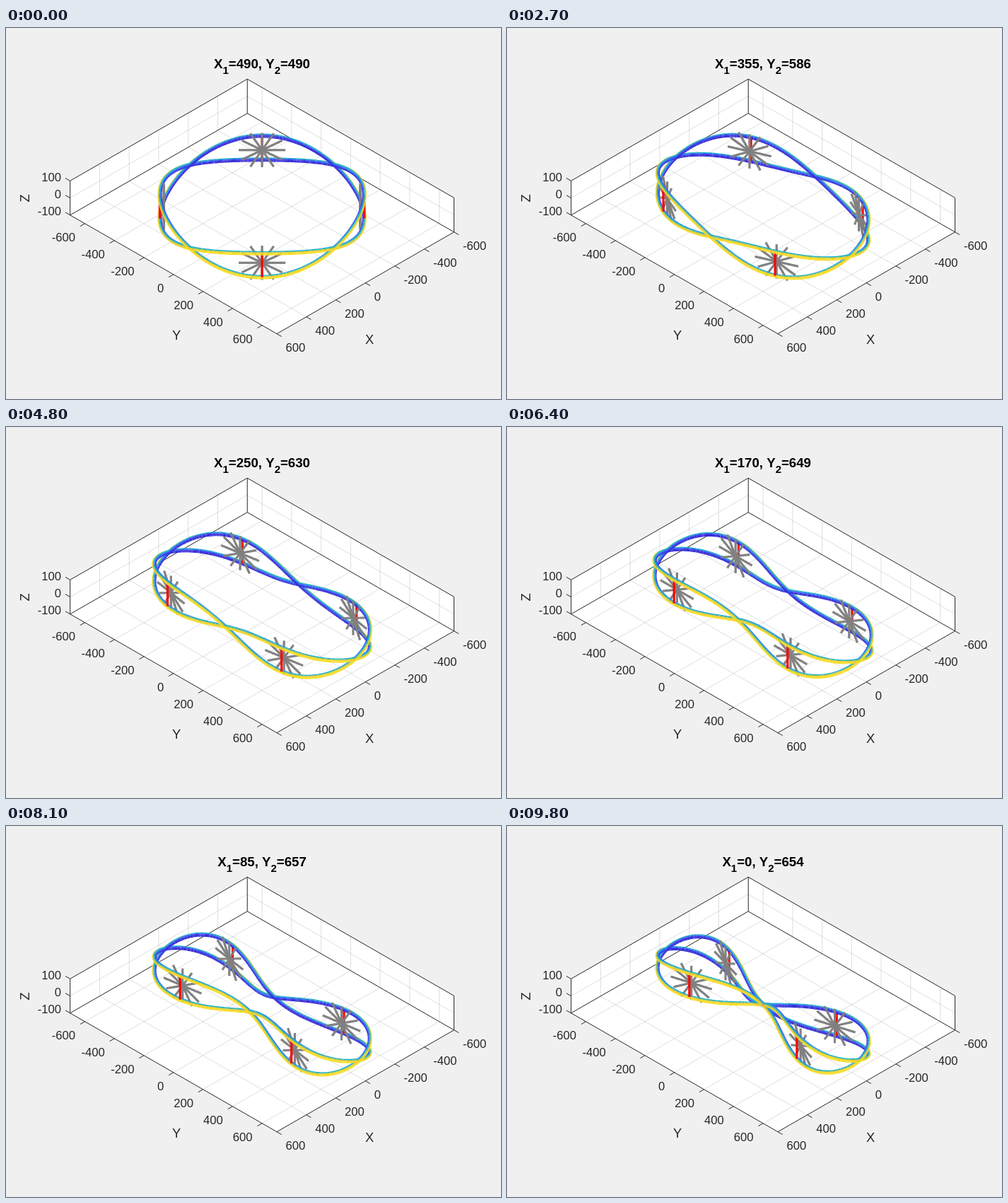
An HTML page with a canvas that plays this animation: 700x525 px, repeating every 9.9 s.

```html
<!DOCTYPE html>
<html lang="en">
<head>
<meta charset="utf-8">
<style>
html, body { margin: 0; width: 100%; height: 100%; overflow: hidden; background: #f0f0f0; }
canvas { display: block; }
</style>
</head>
<body>
<canvas id="stage" width="700" height="525"></canvas>
<script>
const ctx = document.getElementById('stage').getContext('2d');
const FONT = '"Liberation Sans", Arial, sans-serif';
const INK = '#262626';
const STEPS = 99, STEP_MS = 100;
const XL = 600, YL = 700, ZL = 100;
const TUBE = 2.9, BANDS = 6, SEGS = 180;
const RAMP = [[57, 46, 216], [61, 98, 248], [41, 146, 242], [18, 177, 200],
              [84, 200, 138], [226, 197, 55], [249, 220, 40]];

const project = (x, y, z) => [362.1 + (y - x) * 0.2088, 252.5 + (x + y) * 0.12 - z * 0.2425];

function ramp(v) {
  const f = Math.max(0, Math.min(0.9999, (v + 1) / 2)) * (RAMP.length - 1);
  const i = Math.floor(f);
  return `rgb(${RAMP[i].map((c, k) => Math.round(c + (RAMP[i + 1][k] - c) * (f - i)))})`;
}

function line(a, b, color, width) {
  ctx.strokeStyle = color;
  ctx.lineWidth = width;
  ctx.beginPath();
  ctx.moveTo(a[0], a[1]);
  ctx.lineTo(b[0], b[1]);
  ctx.stroke();
}

function text(str, x, y, align, size = 16.67) {
  ctx.font = `${size}px ${FONT}`;
  ctx.fillStyle = INK;
  ctx.textAlign = align;
  ctx.fillText(str, x, y + size * 0.36);
}

function face(points) {
  ctx.beginPath();
  points.forEach(p => ctx.lineTo(...project(...p)));
  ctx.closePath();
  ctx.fill();
}

function drawAxes() {
  ctx.fillStyle = '#f0f0f0';
  ctx.fillRect(0, 0, 700, 525);
  ctx.fillStyle = '#fff';
  face([[-XL, -YL, -ZL], [XL, -YL, -ZL], [XL, YL, -ZL], [-XL, YL, -ZL]]);
  face([[-XL, -YL, -ZL], [XL, -YL, -ZL], [XL, -YL, ZL], [-XL, -YL, ZL]]);
  face([[-XL, -YL, -ZL], [-XL, YL, -ZL], [-XL, YL, ZL], [-XL, -YL, ZL]]);

  const rule = (a, b, color) => line(project(...a), project(...b), color, 1);
  const grid = 'rgba(38,38,38,0.15)';
  for (let v = -600; v <= 600; v += 200) {
    if (Math.abs(v) < XL) {
      rule([v, -YL, -ZL], [v, YL, -ZL], grid);
      rule([v, -YL, -ZL], [v, -YL, ZL], grid);
    }
    rule([-XL, v, -ZL], [XL, v, -ZL], grid);
    rule([-XL, v, -ZL], [-XL, v, ZL], grid);
  }
  rule([-XL, -YL, 0], [XL, -YL, 0], grid);
  rule([-XL, -YL, 0], [-XL, YL, 0], grid);

  for (const z of [-ZL, ZL]) {
    rule([-XL, -YL, z], [XL, -YL, z], INK);
    rule([-XL, -YL, z], [-XL, YL, z], INK);
  }
  rule([XL, -YL, -ZL], [XL, YL, -ZL], INK);
  rule([-XL, YL, -ZL], [XL, YL, -ZL], INK);
  for (const [x, y] of [[-XL, -YL], [XL, -YL], [-XL, YL]]) rule([x, y, -ZL], [x, y, ZL], INK);

  for (let v = -600; v <= 600; v += 200) {
    const py = project(XL, v, -ZL), px = project(v, YL, -ZL);
    rule([XL, v, -ZL], [XL + 32, v, -ZL], INK);
    rule([v, YL, -ZL], [v, YL + 32, -ZL], INK);
    text(v, py[0] - 13.5, py[1] + 19, 'right');
    text(v, px[0] + 12.5, px[1] + 18.8, 'left');
  }
  for (const z of [-100, 0, 100]) {
    rule([XL, -YL, z], [XL, -YL - 32, z], INK);
    text(z, 78, project(XL, -YL, z)[1] - 5.5, 'right');
  }
  text('X', 514, 440, 'center', 18.33);
  text('Y', 241, 434, 'center', 18.33);
  ctx.save();
  ctx.translate(26, 241);
  ctx.rotate(-Math.PI / 2);
  text('Z', 0, 0, 'center', 18.33);
  ctx.restore();
}

function drawTitle(x1, y2) {
  const parts = [['X'], ['1', true], [`=${x1}, Y`], ['2', true], [`=${y2}`]];
  const setFont = sub => ctx.font = `bold ${sub ? 15 : 18.67}px ${FONT}`;
  const widths = parts.map(([s, sub]) => { setFont(sub); return ctx.measureText(s).width; });
  let x = 362 - widths.reduce((a, b) => a + b) / 2;
  ctx.fillStyle = '#000';
  ctx.textAlign = 'left';
  parts.forEach(([s, sub], i) => {
    setFont(sub);
    ctx.fillText(s, x, sub ? 65 : 56.5);
    x += widths[i];
  });
}

// Plan outline as a few odd harmonics, from a circle to a figure eight.
function outline(t) {
  const x1 = 490 * (1 - t);
  const rise = 385.9 + (t - 0.1633) * (-317.8 + (t - 0.3776) * (98.2 - 39.6 * (t - 0.6531)));
  const y2 = 490 + t * rise;
  const e = 6 * t;
  const c = -t * (126.5 - 31 * t) - e, d = -t * (101.3 - 31.8 * t);
  const a = x1 - c - e, b = y2 + d;
  const at = q => {
    const dx = -a * Math.sin(q) - 3 * c * Math.sin(3 * q) - 5 * e * Math.sin(5 * q);
    const dy = b * Math.cos(q) + 3 * d * Math.cos(3 * q);
    const len = Math.hypot(dx, dy);
    return {
      x: a * Math.cos(q) + c * Math.cos(3 * q) + e * Math.cos(5 * q),
      y: b * Math.sin(q) + d * Math.sin(3 * q),
      tx: dx / len, ty: dy / len
    };
  };
  return { x1, y2, at };
}

function addTube(items, at, sign) {
  const R2 = Math.SQRT2, R3 = Math.sqrt(3), R6 = Math.sqrt(6);
  const point = i => {
    const q = i / SEGS * 2 * Math.PI, p = at(q);
    return { ...p, z: sign * 70 * Math.sin(2 * q) };
  };
  for (let i = 0; i < SEGS; i++) {
    const p = point(i), n = point(i + 1), m = at((i + 0.5) / SEGS * 2 * Math.PI);
    const a = project(p.x, p.y, p.z), b = project(n.x, n.y, n.z);
    const len = Math.hypot(b[0] - a[0], b[1] - a[1]) || 1;
    const ux = (b[0] - a[0]) / len, uy = (b[1] - a[1]) / len;
    const nx = m.ty, ny = -m.tx;
    const side = uy * (ny - nx) / R2 + ux * (-nx - ny) / R6;
    const front = (nx + ny) / R3;
    items.push({
      depth: (p.x + p.y + p.z + n.x + n.y + n.z) / 2,
      draw() {
        for (let k = 0; k < BANDS; k++) {
          const s = (2 * k + 1) / BANDS - 1;
          const color = ramp(1.2 * (s * side + Math.sqrt(1 - s * s) * front));
          const ox = uy * s * TUBE, oy = -ux * s * TUBE;
          line([a[0] + ox - ux * 0.4, a[1] + oy - uy * 0.4],
               [b[0] + ox + ux * 0.4, b[1] + oy + uy * 0.4], color, 2 * TUBE / BANDS + 0.2);
        }
      }
    });
  }
}

function addRod(items, from, to, color, pieces) {
  const mix = f => from.map((v, i) => v + (to[i] - v) * f);
  for (let i = 0; i < pieces; i++) {
    const a = mix(i / pieces), b = mix(Math.min(1, (i + 1.1) / pieces)), m = mix((i + 0.5) / pieces);
    items.push({
      depth: m[0] + m[1] + m[2],
      draw: () => line(project(...a), project(...b), color, 3.2)
    });
  }
}

function addWheel(items, p) {
  const cx = p.x - 20 * p.ty, cy = p.y + 20 * p.tx;
  for (let k = 0; k < 12; k++) {
    const w = k * Math.PI / 6, s = Math.sin(w);
    const len = Math.min(112, ZL / Math.max(Math.abs(s), 0.01));
    const h = len * Math.cos(w);
    addRod(items, [cx, cy, 0], [cx + h * p.tx, cy + h * p.ty, len * s], '#808080', 8);
  }
  addRod(items, [p.x, p.y, -70], [p.x, p.y, 70], '#f00', 12);
}

function render(step) {
  const { x1, y2, at } = outline(step / (STEPS - 1));
  const items = [];
  addTube(items, at, 1);
  addTube(items, at, -1);
  for (let k = 0; k < 4; k++) addWheel(items, at((k + 0.5) * Math.PI / 2));
  items.sort((a, b) => a.depth - b.depth);
  drawAxes();
  items.forEach(item => item.draw());
  drawTitle(Math.round(x1), Math.round(y2));
}

let shown = -1;
const start = performance.now();
function tick() {
  const step = Math.floor((performance.now() - start) / STEP_MS) % STEPS;
  if (step !== shown) render(shown = step);
  requestAnimationFrame(tick);
}
tick();
</script>
</body>
</html>
```
